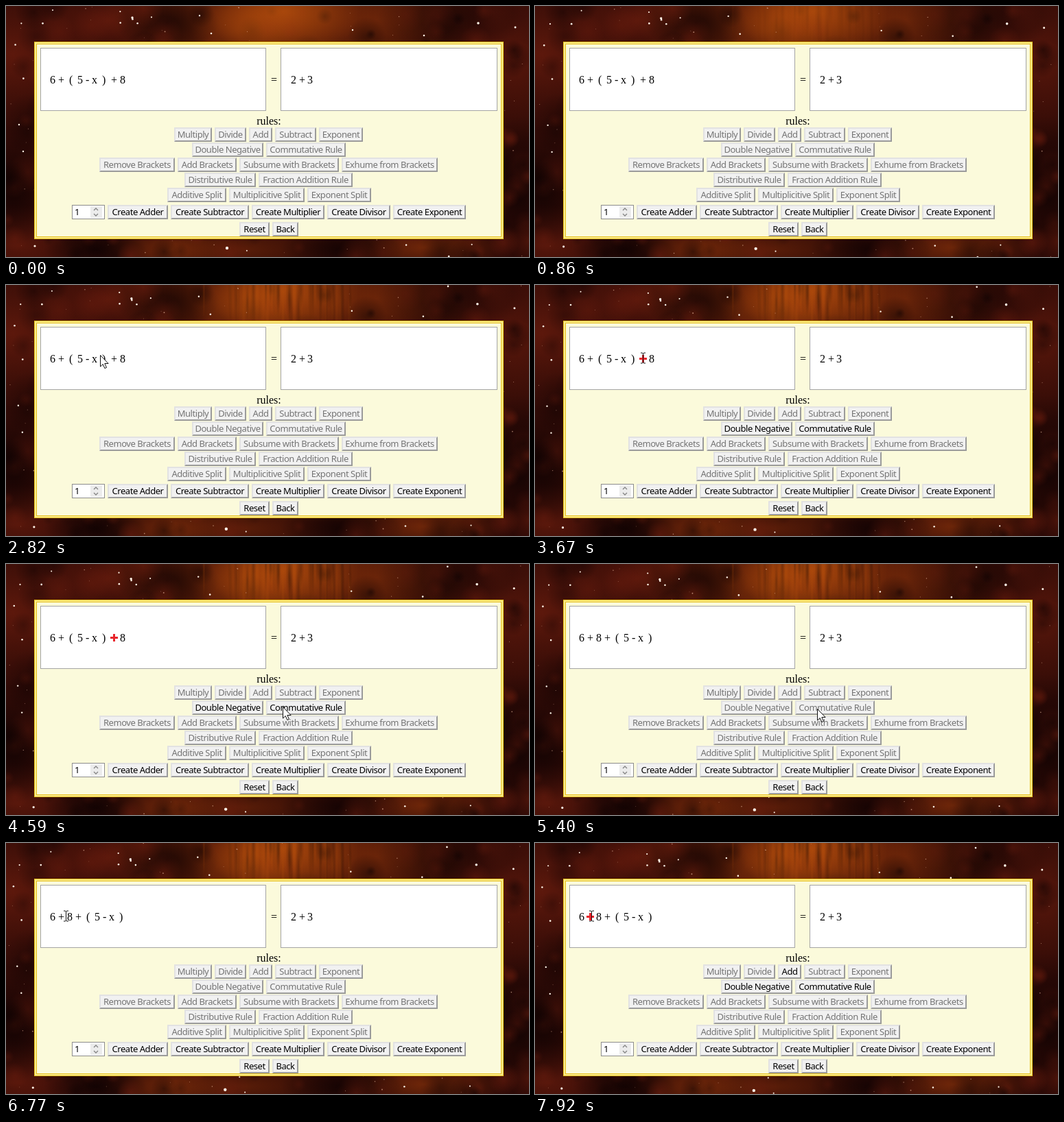
Write an HTML page with a canvas that moves like this. It is 762 px wide and 366 px high and loops after 8000 ms.

```html
<!DOCTYPE html>
<html lang="en">
<head>
<meta charset="utf-8">
<title>Equation rules</title>
<style>
html, body { margin: 0; width: 100%; height: 100%; overflow: hidden; background: #1c0504; }
canvas { display: block; }
</style>
</head>
<body>
<canvas id="stage" width="762" height="366"></canvas>
<script>
const W = 762, H = 366, LOOP = 8000;
const ctx = document.getElementById('stage').getContext('2d');
const SERIF = '16px "Liberation Serif", "Times New Roman", serif';
const SANS = '13px "Noto Sans", Tahoma, sans-serif';

// Moments when the state of the page changes, in ms
const PICK_1 = 3430, SWAP = 5320, PICK_2 = 7170;

function seeded(seed) {
  return () => {
    seed = (seed * 16807) % 2147483647;
    return seed / 2147483647;
  };
}

function layer(draw) {
  const c = document.createElement('canvas');
  c.width = W;
  c.height = H;
  draw(c.getContext('2d'));
  return c;
}

function blob(g, x, y, rx, ry, rgb, alpha) {
  g.save();
  g.translate(x, y);
  g.scale(rx, ry);
  const grad = g.createRadialGradient(0, 0, 0, 0, 0, 1);
  grad.addColorStop(0, `rgba(${rgb},${alpha})`);
  grad.addColorStop(0.5, `rgba(${rgb},${alpha * 0.5})`);
  grad.addColorStop(1, `rgba(${rgb},0)`);
  g.fillStyle = grad;
  g.fillRect(-1, -1, 2, 2);
  g.restore();
}

const RED = '112,30,14', BROWN = '128,46,10', ORANGE = '186,82,12', DARK = '14,2,2';

const nebula = layer(g => {
  g.fillStyle = '#2e0a06';
  g.fillRect(0, 0, W, H);
  blob(g, 10, 70, 130, 110, RED, 0.7);
  blob(g, 150, 20, 110, 60, RED, 0.6);
  blob(g, 380, 15, 240, 85, BROWN, 0.95);
  blob(g, 540, 20, 150, 70, BROWN, 0.6);
  blob(g, 740, 80, 110, 120, RED, 0.6);
  blob(g, 20, 350, 120, 60, RED, 0.6);
  blob(g, 240, 355, 100, 40, BROWN, 0.8);
  blob(g, 350, 355, 130, 40, BROWN, 0.5);
  blob(g, 610, 352, 120, 40, BROWN, 0.8);
  blob(g, 235, 24, 75, 45, DARK, 0.75);
  blob(g, 650, 18, 110, 45, DARK, 0.5);
  blob(g, 10, 270, 60, 80, DARK, 0.75);
  blob(g, 130, 355, 75, 35, DARK, 0.85);
  blob(g, 490, 355, 90, 35, DARK, 0.75);
  blob(g, 750, 270, 70, 110, DARK, 0.7);

  const rnd = seeded(417);
  for (let i = 0; i < 220; i++) {
    const x = rnd() * W, y = rnd() * H, r = 6 + rnd() * 20;
    blob(g, x, y, r * 1.2, r * 1.2, i % 2 ? DARK : RED, 0.2 + rnd() * 0.3);
  }
  blob(g, 405, 8, 110, 70, ORANGE, 0.75);
  blob(g, 345, 35, 75, 45, ORANGE, 0.35);
});

// Soft vertical smear that builds up over the bright cloud
const smear = layer(g => {
  const rnd = seeded(92);
  for (let i = 0; i < 50; i++) {
    const x = 405 + (rnd() + rnd() - 1) * 130, h = 25 + rnd() * 40;
    blob(g, x, rnd() * 40, 2 + rnd() * 3, h, i % 2 ? DARK : ORANGE, 0.3);
  }
});

const stars = [[68, 6, 1], [184, 17, 1.7], [282, 14, 1.2], [299, 40, 1.3], [505, 35, 1.2],
  [609, 43, 1.3], [688, 25, 1.8], [742, 31, 1.5], [19, 173, 1.2], [25, 212, 1.2],
  [42, 350, 1.6], [322, 353, 2.2]];
const starRnd = seeded(2024);
for (let i = 0; i < 170; i++) {
  stars.push([starRnd() * W, starRnd() * H, 0.45 + starRnd() ** 3 * 0.9]);
}

function drawSky(t) {
  ctx.drawImage(nebula, 0, 0);
  ctx.globalAlpha = Math.min(1, t / 3200) * 0.8;
  ctx.drawImage(smear, 0, 0);
  ctx.globalAlpha = 1;
  for (const [x, y, r] of stars) {
    const px = (x - t * 0.0004 + W) % W, py = (y + t * 0.001) % H;
    ctx.fillStyle = r > 0.95 ? '#fff4e8' : 'rgba(225,175,150,0.7)';
    ctx.beginPath();
    ctx.arc(px, py, r, 0, 7);
    ctx.fill();
  }
}

function box(x, y, w, h, line, fill) {
  ctx.fillStyle = line;
  ctx.fillRect(x, y, w, h);
  ctx.fillStyle = fill;
  ctx.fillRect(x + 1, y + 1, w - 2, h - 2);
}

function label(str, x, y, font, color = '#000', align = 'left') {
  ctx.font = font;
  ctx.letterSpacing = font === SANS ? '-0.45px' : '0px';
  ctx.fillStyle = color;
  ctx.textAlign = align;
  ctx.fillText(str, x, y);
}

function button(str, x, y, w, on) {
  const h = 21;
  ctx.fillStyle = '#9b9b9b';
  ctx.fillRect(x, y, w, h);
  ctx.fillStyle = '#e2e2e2';
  ctx.beginPath();
  ctx.moveTo(x, y + h);
  ctx.lineTo(x, y);
  ctx.lineTo(x + w, y);
  ctx.lineTo(x + w - 2, y + 2);
  ctx.lineTo(x + 2, y + 2);
  ctx.lineTo(x + 2, y + h - 2);
  ctx.fill();
  ctx.fillStyle = '#f1f1f1';
  ctx.fillRect(x + 2, y + 2, w - 4, h - 4);
  label(str, x + w / 2, y + 15, SANS, on ? '#000' : '#747474', 'center');
}

// Each row: left, top, then name and width of every button
const rows = [
  [245, 177, 'Multiply', 55, 'Divide', 46, 'Add', 34, 'Subtract', 60, 'Exponent', 64],
  [271, 199, 'Double Negative', 104, 'Commutative Rule', 116],
  [136, 221, 'Remove Brackets', 110, 'Add Brackets', 86, 'Subsume with Brackets', 145,
    'Exhume from Brackets', 140],
  [260, 243, 'Distributive Rule', 104, 'Fraction Addition Rule', 137],
  [235, 265, 'Additive Split', 86, 'Multiplicitive Split', 110, 'Exponent Split', 93],
  [148, 290, 'Create Adder', 88, 'Create Subtractor', 114, 'Create Multiplier', 106,
    'Create Divisor', 92, 'Create Exponent', 106],
  [340, 315, 'Reset', 44, 'Back', 38]
];

function chevron(x, y, d) {
  ctx.beginPath();
  ctx.moveTo(x - 3, y);
  ctx.lineTo(x, y + 3 * d);
  ctx.lineTo(x + 3, y);
  ctx.stroke();
}

function drawSpinner() {
  box(96, 290, 48, 21, '#8c8c8c', '#fff');
  ctx.fillStyle = '#ececec';
  ctx.fillRect(123, 292, 17, 17);
  ctx.strokeStyle = '#858585';
  ctx.lineWidth = 1.3;
  chevron(131, 298, -1);
  chevron(131, 303, 1);
  label('1', 100, 305, SANS);
}

function tokens(str, xs) {
  [...str].forEach((ch, i) => label(ch, xs[i], 113, SERIF));
}

function redPlus(x) {
  ctx.fillStyle = '#fff';
  ctx.fillRect(x - 5, 102, 10, 11);
  ctx.fillStyle = '#e8262c';
  ctx.fillRect(x - 5, 106, 11, 3);
  ctx.fillRect(x - 1, 102, 3, 11);
}

function drawPanel(t) {
  box(41, 52, 684, 288, '#e6bf1a', '#fbeb8c');
  box(44, 55, 678, 282, '#e6bf1a', '#fbfadb');
  box(50, 61, 329, 92, '#a4a4a4', '#fff');
  box(400, 61, 316, 92, '#a4a4a4', '#fff');

  if (t < SWAP) tokens('6+(5-x)+8', [64, 76, 92, 104, 116, 125, 140, 153, 166]);
  else tokens('6+8+(5-x)', [64, 76, 89, 101, 117, 129, 141, 150, 165]);
  tokens('2+3', [415, 427, 439]);
  label('=', 386, 113, SERIF);
  label('rules:', 383, 173, SERIF, '#000', 'center');

  const first = t >= PICK_1 && t < SWAP, second = t >= PICK_2;
  if (first) redPlus(157);
  if (second) redPlus(80);

  rows.forEach(([left, top, ...items], r) => {
    let x = left;
    for (let i = 0; i < items.length; i += 2) {
      const on = r > 4 || (r === 1 && (first || second)) || (items[i] === 'Add' && second);
      button(items[i], x, top, items[i + 1], on);
      x += items[i + 1] + 4;
    }
  });
  drawSpinner();
}

// Pointer path: time, x, y
const path = [[850, 262, 372], [1500, 184, 130], [1900, 184, 130], [2820, 137, 102],
  [3300, 157, 106], [3700, 157, 106], [4700, 411, 211], [5540, 411, 211],
  [6600, 87, 106], [6800, 87, 106], [7100, 82, 106], [LOOP, 82, 106]];

function pointerAt(t) {
  const i = path.findIndex(p => p[0] > t);
  const [t0, x0, y0] = path[i - 1], [t1, x1, y1] = path[i];
  const k = (t - t0) / (t1 - t0), e = k * k * (3 - 2 * k);
  return [x0 + (x1 - x0) * e, y0 + (y1 - y0) * e];
}

const arrow = new Path2D('M0 0V16.5L3.7 13L6.4 19L9 17.9L6.3 12H11.6Z');
const beam = new Path2D('M-3.5 -7.5H-1L0 -6.5L1 -7.5H3.5M0 -6.5V6.5M-3.5 7.5H-1L0 6.5L1 7.5H3.5');

function drawPointer(t) {
  if (t < path[0][0]) return;
  const [x, y] = pointerAt(t);
  const overText = y < 114 && ((t > 3050 && t < 3950) || t > 6300);
  ctx.save();
  ctx.translate(Math.round(x) + 0.5, Math.round(y) + 0.5);
  ctx.lineWidth = 1;
  ctx.strokeStyle = '#111';
  if (overText) {
    ctx.stroke(beam);
  } else {
    ctx.fillStyle = '#fff';
    ctx.fill(arrow);
    ctx.stroke(arrow);
  }
  ctx.restore();
}

function frame(now) {
  const t = now % LOOP;
  drawSky(t);
  drawPanel(t);
  drawPointer(t);
  requestAnimationFrame(frame);
}
requestAnimationFrame(frame);
</script>
</body>
</html>
```
